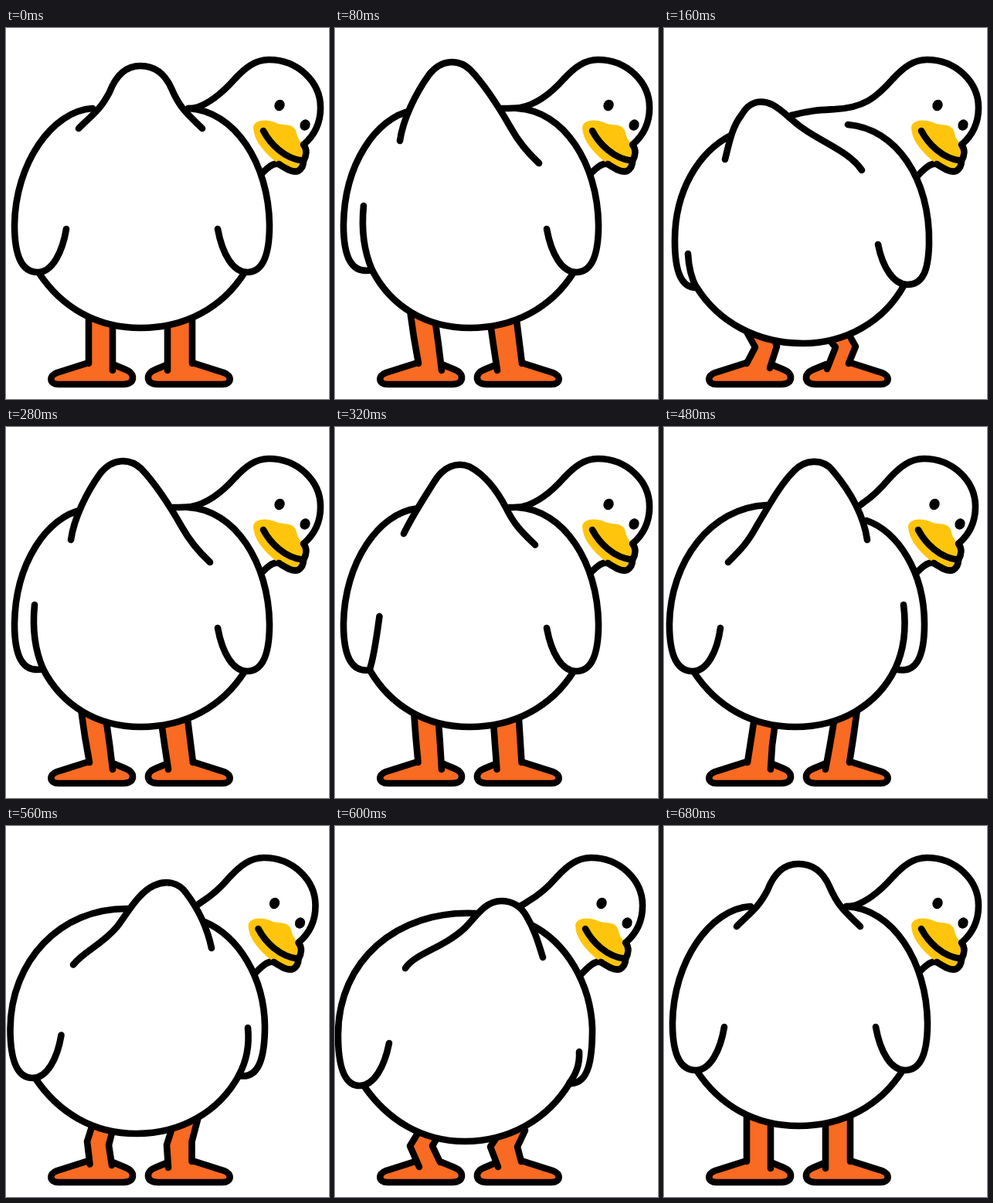
An HTML page for the animation above (720 ms loop, 418 by 480 pixels).

```html
<!DOCTYPE html>
<html lang="en">
<head>
<meta charset="utf-8">
<title>Waddling goose</title>
<style>
  html, body { margin: 0; width: 100%; height: 100%; overflow: hidden; background: #fff; }
  svg { display: block; width: 418px; height: 480px; }
  .ink { fill: #fff; stroke: #000; stroke-width: 8.6; stroke-linecap: round; stroke-linejoin: round; }
  .line { fill: none; }
  .orange { fill: #f96a22; }
  .yellow { fill: #fec50c; }
</style>
</head>
<body>
<svg viewBox="0 0 418 480">
  <defs>
    <path id="foot" class="ink orange" d="M107 433 L66 446 C55 450 56 461 68 461 H152 C167 461 168 447 155 442 L138 435"/>
  </defs>
  <use href="#foot"/>
  <use href="#foot" transform="matrix(-1 0 0 1 348 0)"/>
  <g id="legs"></g>
  <g id="head">
    <path id="neck" class="ink"/>
    <path class="yellow" d="M320 129 C321 117 340 118 350 123 C359 127 373 122 376 136 C377 144 384 149 386 155 L386 170 L378 183 C362 183 349 174 341 166 C331 156 321 145 320 129Z"/>
    <path class="ink line" d="M333 133 C342 150 360 169 385 172 C389 165 390 157 385 151"/>
    <path class="ink line" d="M353 176 C361 181 371 188 378 185 C383 182 385 177 385 172"/>
    <ellipse cx="354" cy="100" rx="6.5" ry="7.5" transform="rotate(25 354 100)"/>
    <ellipse cx="387" cy="125.500" rx="6.5" ry="7.3" transform="rotate(25 387 125.500)"/>
  </g>
  <path id="belly" class="ink"/>
  <path id="left" class="ink"/>
  <path id="right" class="ink"/>
  <path id="tail" class="ink"/>
</svg>
<script>
const SKULL = ' C310 51 323 41 340 41 C378 41 407 70 407 103 C407 124 398 140 385 151 L353 176 C346 174 338 180 322 198';

const center = {
  dx: 0,
  neck: 'M236 104 C240 104 242 104 246 103 C262 98 280 84 296 66',
  belly: 'M42 316 C72 362 118 388 174 388 C232 388 280 362 309 316',
  left: 'M112 104 C60 107 12 175 11 255 C11 296 21 316 41 316 C60 316 73 290 78 260',
  right: 'M274 260 C280 293 294 316 312 316 C331 316 341 296 341 255 C340 175 296 107 236 104',
  tail: 'M94 130 C112 112 122 106 134 83 C142 62 155 49 174 49 C193 49 206 60 214 78 C226 106 236 112 254 130',
  legL: 'M107 370 L107 402 L107 434 M138 443 L138 410 L138 375',
  legR: 'M209 375 L209 410 L209 443 M241 434 L241 402 L241 370'
};

const leftUp = {
  ...center,
  neck: 'M216 104 C224 104 232 104 240 103 C260 99 280 84 296 66',
  belly: 'M48 313 C72 360 118 388 174 388 C232 388 280 362 309 316',
  left: 'M99 107 C54 116 12 175 11 255 C11 296 21 319 48 313 C38 290 34 260 37 230',
  tail: 'M84 146 C88 118 104 85 122 60 C138 40 160 40 175 54 C195 75 212 102 228 130 C238 148 250 162 264 175',
  legL: 'M97 365 L102 400 L108 434 M138 443 L134 410 L129 375',
  legR: 'M200 375 L205 410 L210 443 M242 434 L238 402 L234 370'
};

const leftDown = {
  dx: 0,
  neck: 'M165 113 C190 106 205 106 222 105 C258 103 274 91 296 66',
  belly: 'M42 335 C70 380 120 408 180 408 C235 408 285 380 311 332',
  left: 'M88 138 C45 160 14 210 14 275 C14 315 22 336 42 336 C36 325 32 310 31 292',
  right: 'M277 280 C283 311 298 332 315 332 C336 332 342 312 343 280 C345 195 300 130 238 125',
  tail: 'M79 170 C84 150 88 128 100 113 C110 95 125 92 140 99 C155 107 165 120 180 130 C205 148 240 160 256 184',
  legL: 'M108 395 L118 413 L107 434 M137 440 L146 412 L142 400',
  legR: 'M211 400 L222 413 L211 441 M239 434 L248 412 L239 396'
};

const rightUp = {
  dx: -4,
  neck: 'M254 104 C256 103 258 101 262 98 C274 90 285 79 296 66',
  belly: 'M38 316 C68 362 114 388 170 388 C228 388 276 360 299 313',
  left: 'M133 101 C60 104 8 175 7 255 C7 296 17 316 37 316 C56 316 69 290 73 260',
  right: 'M310 230 C314 262 310 290 299 313 C327 321 337 296 337 255 C337 187 302 135 262 121',
  tail: 'M83 175 C100 158 108 150 120 128 C135 103 150 75 168 57 C182 42 205 40 218 56 C240 82 258 112 263 146',
  legL: 'M118 370 L113 402 L108 434 M138 443 L140 412 L145 375',
  legR: 'M221 375 L215 410 L209 443 M240 434 L245 402 L250 366'
};

const rightDown = {
  dx: -9,
  neck: 'M246 105 C250 103 254 101 258 98 C272 90 284 80 296 66',
  belly: 'M38 337 C68 380 112 408 168 408 C225 408 275 380 304 332',
  left: 'M182 113 C80 108 4 175 4 270 C4 316 14 336 32 336 C50 336 64 312 70 281',
  right: 'M316 292 C317 310 311 322 303 333 C329 335 333 300 333 262 C331 205 300 150 252 127',
  tail: 'M91 184 C103 165 140 158 168 132 C182 118 194 97 215 97 C232 97 242 106 248 117 C257 132 262 147 269 170',
  legL: 'M108 396 L97 414 L109 441 M136 435 L126 414 L134 400',
  legR: 'M211 400 L201 415 L211 441 M241 434 L236 415 L246 394'
};

// Pose halfway between two others; matching paths share their structure.
function between(a, b) {
  const pose = { dx: (a.dx + b.dx) / 2 };
  for (const part in a) {
    if (part === 'dx') continue;
    const other = b[part].match(/\d+/g);
    let i = 0;
    pose[part] = a[part].replace(/\d+/g, n => (+n + +other[i++]) / 2);
  }
  return pose;
}

const LOOP = 720;
const steps = [
  [0, center],
  [80, leftUp],
  [160, leftDown],
  [280, leftUp],
  [320, between(leftUp, center)],
  [360, center],
  [480, rightUp],
  [560, between(rightUp, rightDown)],
  [600, rightDown],
  [680, center]
];

const el = id => document.getElementById(id);

function leg(d) {
  const shape = 'M' + d.slice(1).replace('M', 'L');
  return `<path class="orange" d="${shape}"/><path class="ink line" d="${d}"/>`;
}

function draw(pose) {
  for (const id of ['belly', 'left', 'right', 'tail']) el(id).setAttribute('d', pose[id]);
  el('neck').setAttribute('d', pose.neck + SKULL);
  el('head').setAttribute('transform', `translate(${pose.dx} 0)`);
  el('legs').innerHTML = leg(pose.legL) + leg(pose.legR);
}

let shown;
function tick() {
  const t = performance.now() % LOOP;
  const pose = steps.filter(s => s[0] <= t).pop()[1];
  if (pose !== shown) draw(shown = pose);
  requestAnimationFrame(tick);
}
tick();
</script>
</body>
</html>
```
